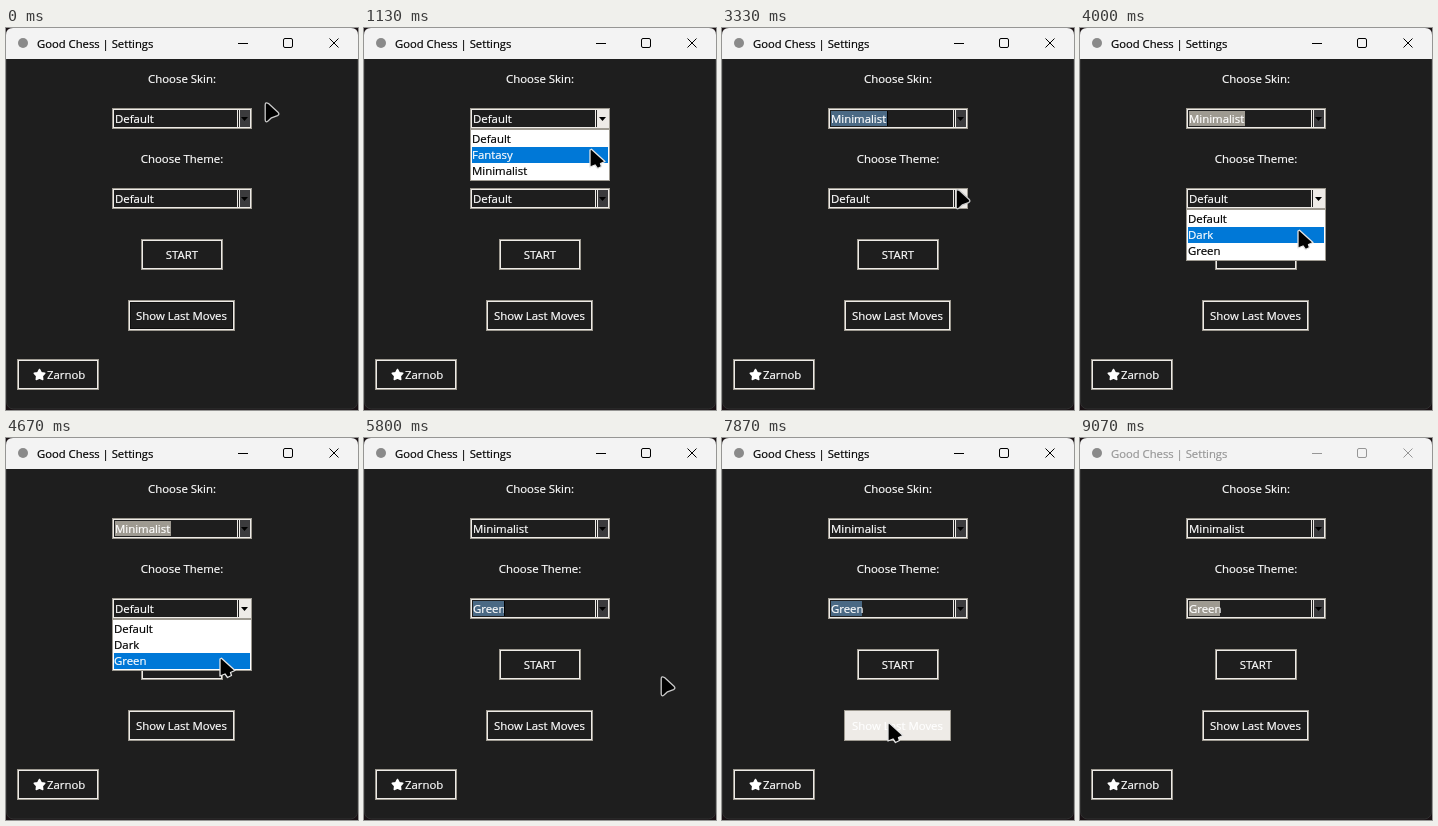
Write an HTML page that moves like this. It is 352 px wide and 382 px high and loops after 9200 ms.

```html
<!DOCTYPE html>
<html lang="en">
<head>
<meta charset="utf-8">
<title>Good Chess | Settings</title>
<style>
html, body { margin: 0; width: 100%; height: 100%; overflow: hidden; background: #191114; }
svg { display: block; width: 352px; height: 382px; }
text { font: 11.4px "Open Sans", "Noto Sans", sans-serif; white-space: pre; stroke-width: .2px; }
</style>
</head>
<body>
<svg id="stage" viewBox="0 0 352 382"></svg>
<script>
const LOOP = 9200, STEP = 1000 / 15;
const BODY = '#1e1e1e', LIGHT = '#eeebe7', EDGE = '#9e9a91', BLUE = '#4a6984';
const stage = document.getElementById('stage');

// Clicks and loss of focus, in ms
const OPEN_SKIN = 390, PICK_SKIN = 2790, OPEN_THEME = 3390, PICK_THEME = 5320, BLUR = 8990;

// Pointer moves: from, to (ms), then where the tip arrives
const home = { x: 258, y: 74 };
const moves = [
  [0, 333, 238, 90], [867, 1267, 224, 121], [1467, 1667, 217, 140],
  [2000, 2333, 261, 138], [2400, 2600, 230, 143], [2933, 3333, 233, 161],
  [3667, 4200, 216, 203], [4333, 4667, 213, 219], [5533, 5800, 296, 238],
  [5867, 6267, 213, 281], [6600, 7000, 83, 345], [7333, 7867, 165, 284],
  [8067, 8333, 155, 323], [8600, 8800, 98, 390]
];

const skins = ['Default', 'Fantasy', 'Minimalist'];
const themes = ['Default', 'Dark', 'Green'];

function pointerAt(t) {
  let { x, y } = home;
  for (const [from, to, toX, toY] of moves) {
    if (t < from) break;
    const u = Math.min(1, (t - from) / (to - from)), e = 1 - (1 - u) ** 3;
    x += (toX - x) * e;
    y += (toY - y) * e;
  }
  return { x: Math.round(x), y: Math.round(y) };
}

const inside = (p, x, y, w, h) => p.x >= x && p.x < x + w && p.y >= y && p.y < y + h;
const rect = (x, y, w, h, fill, more = '') =>
  `<rect x="${x}" y="${y}" width="${w}" height="${h}" fill="${fill}" ${more}/>`;
const text = (x, y, s, fill = '#fff', more = '') =>
  `<text x="${x}" y="${y}" fill="${fill}" stroke="${fill}" ${more}>${s}</text>`;
const centered = (x, y, s) => text(x, y, s, '#fff', 'text-anchor="middle"');

function frame(x, y, w, h, fill) {
  return rect(x + .5, y + .5, w - 1, h - 1, fill, `stroke="${EDGE}"`) +
    rect(x + 1.5, y + 1.5, w - 3, h - 3, 'none', `stroke="${LIGHT}"`);
}

function button(x, y, w, label, hot, focus) {
  return frame(x, y, w, 31, hot ? LIGHT : BODY) +
    (focus ? rect(x + 2.5, y + 2.5, w - 5, 26, 'none', 'stroke="#000" stroke-dasharray="1 1"') : '') + label;
}

function combo(y, value, mark, markWidth, caret, hot) {
  return frame(106, y, 140, 21, BODY) +
    (mark ? rect(109, y + 3, markWidth, 15, mark) : '') +
    text(109, y + 15, value) +
    (caret ? rect(109 + markWidth, y + 3, 1, 15, '#000') : '') +
    rect(231, y + 1, 1, 19, LIGHT) + rect(233, y + 1, 1, 19, LIGHT) +
    rect(234, y + 2, 10, 17, hot ? LIGHT : '#3b3b3d') +
    `<path d="M235 ${y + 9}h7l-3.5 4z"/>`;
}

function list(y, items, p) {
  const current = Math.max(0, Math.min(2, Math.floor((p.y - y - 2) / 16)));
  return rect(106.5, y + .5, 139, 51, '#fff', `stroke="${EDGE}"`) +
    rect(108, y + 2 + current * 16, 136, 16, '#0078d7') +
    items.map((s, i) => text(108, y + 14 + i * 16, s, i === current ? '#fff' : '#000')).join('');
}

function titleBar(active) {
  const ink = active ? '#000' : '#969696';
  return '<path d="M0 31V7Q0 0 7 0H345Q352 0 352 7V31Z" fill="#f3f3f3"/>' +
    '<circle cx="17" cy="15" r="5" fill="#8a8a8a"/>' +
    text(31, 20, 'Good Chess | Settings', ink, 'style="font-size:11.25px"') +
    `<path d="M232 15.5h10M323.5 10.5l9 9m0-9l-9 9" stroke="${ink}"/>` +
    rect(277.5, 10.5, 9, 9, 'none', `stroke="${ink}" rx="1.5"`);
}

function star(cx, cy) {
  const points = Array.from({ length: 10 }, (_, i) => {
    const r = i % 2 ? 3 : 5.6, a = (i / 5 - .5) * Math.PI;
    return `${(cx + r * Math.cos(a)).toFixed(2)},${(cy + r * Math.sin(a)).toFixed(2)}`;
  });
  return `<polygon points="${points.join(' ')}" fill="#fff" stroke="#fff" stroke-width="1.4" stroke-linejoin="round"/>`;
}

function pointer(p, link) {
  const [d, outline] = link
    ? ['M1 2V19L6 17L8.5 20.5L12.5 18.5L11.5 15.5L16 13.5L2.5 1.2Z', '#e4e4e4']
    : ['M1.2 3V18Q1.5 21 4 19L7.5 15.8L13.5 13.6Q16 12.3 14 10.2L4.5 1.5Q1.2-.5 1.2 3Z', '#cacaca'];
  return `<path transform="translate(${p.x} ${p.y})" d="${d}" stroke="${outline}" stroke-width="1.3" stroke-linejoin="round"/>`;
}

function scene(t) {
  const p = pointerAt(t);
  const active = t < BLUR;
  const skinSet = t >= PICK_SKIN, themeSet = t >= PICK_THEME;
  const skinOpen = t >= OPEN_SKIN && !skinSet, themeOpen = t >= OPEN_THEME && !themeSet;
  const skinFocus = skinSet && t < OPEN_THEME;
  const over = (...box) => !skinOpen && !themeOpen && inside(p, ...box);
  const hotStart = over(135, 211, 82, 31);
  const hotMoves = over(122, 272, 107, 31);
  const hotLink = over(11, 331, 82, 31);
  // The link pointer stays after a pick until the mouse moves again
  const onSkins = t >= OPEN_SKIN && t < PICK_SKIN + 160 && inside(p, 106, 101, 140, 52);
  const onThemes = themeOpen && inside(p, 106, 181, 140, 52);
  const skinMark = skinSet && !themeSet && (skinFocus ? BLUE : EDGE);
  const themeMark = themeSet && (active ? BLUE : EDGE);
  const blink = (t - PICK_THEME - 70) % 900 < 600;

  return rect(.5, .5, 351, 380.5, BODY, 'rx="7" stroke="#303030"') +
    titleBar(active) +
    centered(176, 55, 'Choose Skin:') +
    combo(80, skins[skinSet ? 2 : 0], skinMark, 56, skinFocus, skinOpen || over(233, 80, 13, 21)) +
    centered(176, 135, 'Choose Theme:') +
    combo(160, themes[themeSet ? 2 : 0], themeMark, 31, themeSet && active && blink,
      themeOpen || over(233, 160, 13, 21)) +
    button(135, 211, 82, centered(176, 231, 'START'), hotStart) +
    button(122, 272, 107, centered(175.5, 292, 'Show Last Moves'), hotMoves, t < OPEN_SKIN) +
    button(11, 331, 82, star(33.5, 347) + text(41, 351, 'Zarnob'), hotLink) +
    (skinOpen ? list(101, skins, p) : '') +
    (themeOpen ? list(181, themes, p) : '') +
    pointer(p, hotStart || hotMoves || hotLink || onSkins || onThemes);
}

let shown = '';
function tick(now) {
  // The picture advances at 15 steps a second
  const next = scene(Math.floor((now % LOOP + 6) / STEP) * STEP % LOOP);
  if (next !== shown) stage.innerHTML = shown = next;
  requestAnimationFrame(tick);
}
tick(0);
</script>
</body>
</html>
```
